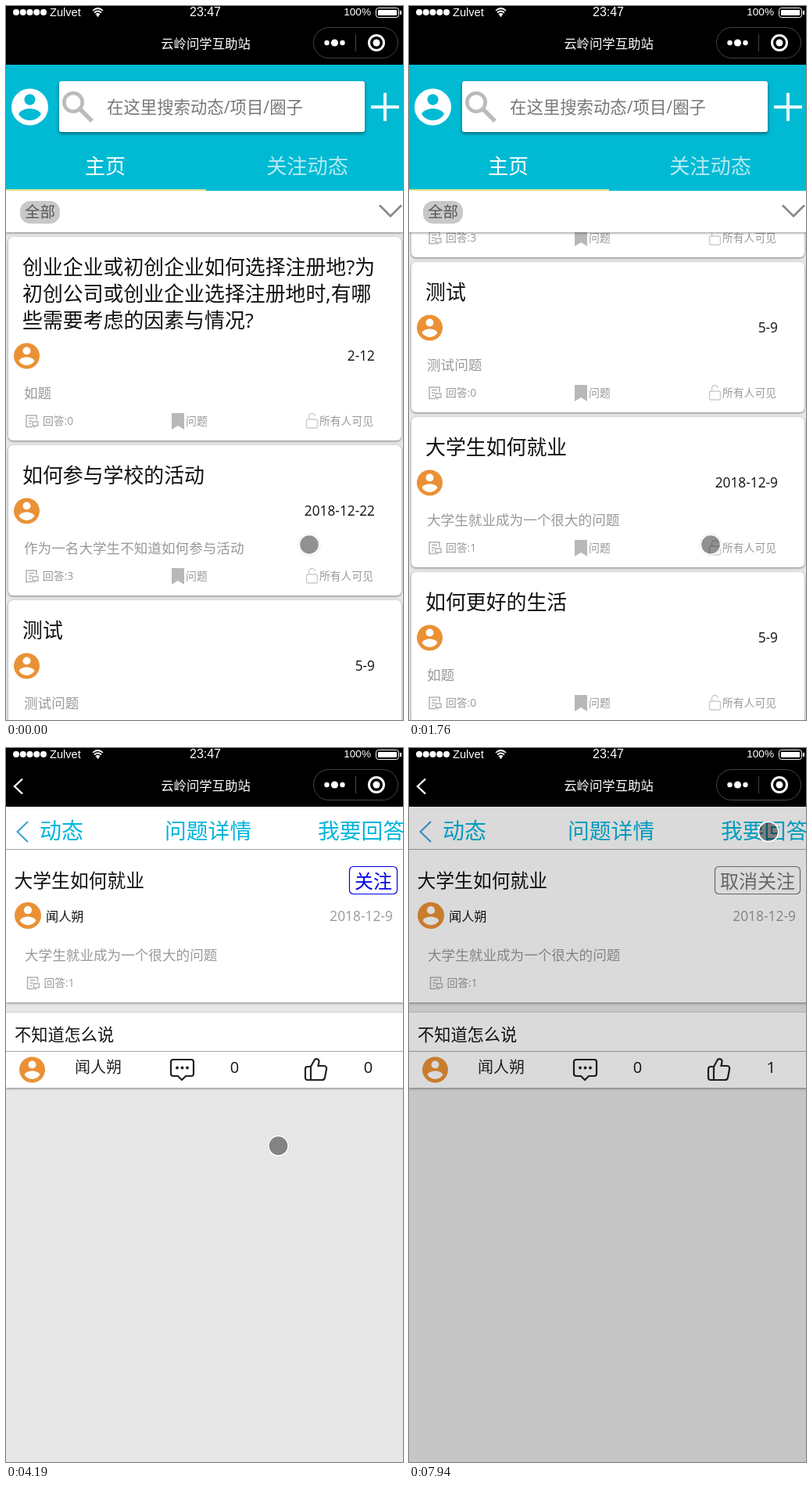
An HTML page with a canvas for the animation above (7.99 s loop, 508 px wide and 912 px high).

```html
<!DOCTYPE html>
<html lang="zh-CN">
<head>
<meta charset="utf-8">
<style>
html, body { margin: 0; width: 100%; height: 100%; overflow: hidden; background: #000; }
canvas { display: block; }
</style>
</head>
<body>
<canvas id="stage" width="508" height="912"></canvas>
<script>
const LOOP = 7990, W = 508, H = 912;
const CJK = '"Open Sans", "Noto Sans CJK SC", "Noto Sans CJK", sans-serif';
const ARIAL = '"Liberation Sans", sans-serif';
const CYAN = '#00bad4', ORANGE = '#ea9135', PAGE = '#e7e7e7';
const USER = '闻人朔';
const c = document.getElementById('stage').getContext('2d');

// [time, value...] keys, linear in between
const SCROLL = [[545, 0], [1380, 252], [1700, 420], [1760, 432]];
const POINTER = [
  [590, 388, 688], [640, 386, 688], [2220, 386, 688], [2960, 322, 586],
  [3740, 322, 586], [3850, 319, 578], [4190, 348, 509], [4450, 479, 290],
  [4570, 462, 233], [4930, 460, 166], [5260, 460, 166], [5720, 436, 391],
  [5900, 440, 405], [6350, 440, 405], [6800, 492, 240], [7070, 482, 167],
  [7300, 460, 107]
];

const CARDS = [
  { title: ['创业企业或初创企业如何选择注册地?为', '初创公司或创业企业选择注册地时,有哪', '些需要考虑的因素与情况?']
      .map(s => s.replace('?', '?').replace(',', ',')), date: '2-12', body: '如题', n: 0 },
  { title: ['如何参与学校的活动'], date: '2018-12-22', body: '作为一名大学生不知道如何参与活动', n: 3 },
  { title: ['测试'], date: '5-9', body: '测试问题', n: 0 },
  { title: ['大学生如何就业'], date: '2018-12-9', body: '大学生就业成为一个很大的问题', n: 1 },
  { title: ['如何更好的生活'], date: '5-9', body: '如题', n: 0 }
];

function sample(keys, t) {
  const i = keys.findIndex(k => k[0] > t);
  if (i === 0) return keys[0].slice(1);
  if (i < 0) return keys[keys.length - 1].slice(1);
  const a = keys[i - 1], b = keys[i], p = (t - a[0]) / (b[0] - a[0]);
  return a.slice(1).map((v, j) => v + (b[j + 1] - v) * p);
}

// y is the visual middle of the line
function text(s, x, y, size, color, align = 'left', font = CJK) {
  c.font = size + 'px ' + font;
  c.fillStyle = color;
  c.textAlign = align;
  c.fillText(s, x, y + size * 0.37);
}

function rect(x, y, w, h, color) {
  c.fillStyle = color;
  c.fillRect(x, y, w, h);
}

function round(x, y, w, h, r, fill, stroke, lw = 1) {
  c.beginPath();
  c.roundRect(x, y, w, h, r);
  if (fill) { c.fillStyle = fill; c.fill(); }
  if (stroke) { c.strokeStyle = stroke; c.lineWidth = lw; c.stroke(); }
}

function disc(x, y, r, color) {
  c.beginPath();
  c.arc(x, y, r, 0, 7);
  c.fillStyle = color;
  c.fill();
}

function ring(x, y, r, color, lw) {
  c.beginPath();
  c.arc(x, y, r, 0, 7);
  c.strokeStyle = color;
  c.lineWidth = lw;
  c.stroke();
}

function line(d, color, lw, x = 0, y = 0) {
  c.save();
  c.translate(x, y);
  c.strokeStyle = color;
  c.lineWidth = lw;
  c.stroke(new Path2D(d));
  c.restore();
}

function shadowed(draw, blur = 3, dy = 1) {
  c.save();
  c.shadowColor = 'rgba(0,0,0,.45)';
  c.shadowBlur = blur;
  c.shadowOffsetY = dy;
  draw();
  c.restore();
}

function avatar(x, y, r, color, inner) {
  disc(x, y, r, color);
  c.save();
  c.translate(x, y);
  c.scale(r / 10, r / 10);
  disc(0, -4, 3, inner);
  c.fill(new Path2D('M-6 4C-6 2-2 .9 0 .9S6 2 6 4C4.7 6 2.5 7.2 0 7.2S-4.7 6-6 4Z'));
  c.restore();
}

function answers(x, y, n) {
  line('M9 7.5H1V-7H14V-1M4-3.5H11M4 0H8M4 3.5H7', '#b0b0b0', 1.5, x, y);
  line('M9 1H16V6H13L11 8V6H9Z', '#b0b0b0', 1.3, x, y);
  text('回答:' + n, x + 22, y, 13.8, '#999');
}

function card(d, y) {
  const extra = (d.title.length - 1) * 34;
  shadowed(() => round(3, y, 503, 192 + extra, 6, '#fff'));
  d.title.forEach((s, i) => text(s, 21, y + 38 + i * 34, 25.9, '#111'));
  y += extra;
  avatar(26.5, y + 84, 16.5, ORANGE, '#fff');
  text(d.date, 472, y + 84, 17.3, '#111', 'right');
  text(d.body, 23, y + 131, 17.6, '#999');
  const m = y + 167;
  answers(25, m, d.n);
  c.fillStyle = '#b8b8b8';
  c.fill(new Path2D(`M212 ${m - 10}h16v21l-8-5-8 5z`));
  text('问题', 230, m, 13.9, '#999');
  round(384.5, m - 2, 14, 11, 2, null, '#ccc', 1.4);
  line('M3-2V-5A4 4 0 0 1 11-6', '#ccc', 1.4, 384.5, m);
  text('所有人可见', 401, m, 13.8, '#999');
}

function home(t) {
  rect(0, 75, W, H, PAGE);
  let y = 295 - sample(SCROLL, t)[0];
  for (const d of CARDS) {
    card(d, y);
    y += 198 + (d.title.length - 1) * 34;
  }
  shadowed(() => rect(0, 236, W, 53, '#fff'));
  rect(0, 75, W, 161, CYAN);
  rect(0, 234, 256, 2, '#dfe48a');

  avatar(30.5, 129, 23.5, '#fff', CYAN);
  shadowed(() => round(68, 96, 391, 65, 3, '#fff'), 4, 2);
  ring(86, 123, 11.7, '#bbb', 4.6);
  line('M94 131L110 147', '#bbb', 5.5);
  text('在这里搜索动态/项目/圈子', 129, 129, 21.4, '#777');
  line('M467 129H503M485 111V147', '#e8fafc', 4);
  text('主页', 127, 204, 26, '#fff', 'center');
  text('关注动态', 385.5, 204, 26.2, 'rgba(255,255,255,.7)', 'center');

  round(18, 249, 51, 29, 13, '#c8c8c8');
  text('全部', 24, 263, 19.4, '#555');
  line('M478 254.5L492 268.5L506 254.5', '#888', 2.6);
}

function detail(x, followed, likes) {
  c.save();
  c.translate(x, 0);
  const left = x > 0 ? -3 : 0;
  rect(left, 75, W + 3, H, PAGE);
  shadowed(() => rect(left, 130, W + 3, 195, '#fff'));
  shadowed(() => rect(left, 338, W + 3, 96, '#fff'));
  rect(left, 75, W + 3, 54, '#fff');
  rect(left, 129, W + 3, 1, '#a5a5a5');
  rect(left, 387, W + 3, 1, '#a5a5a5');

  line('M28 94L14.5 107L28 120', '#3a9fd6', 2);
  text('动态', 43, 106, 28, '#00b5dc');
  text('问题详情', 203, 106, 27.8, '#00b5dc');
  text('我要回答', 399, 106, 27.8, '#00b5dc');

  text('大学生如何就业', 10.5, 169, 23.8, '#111');
  const tone = followed ? '#777' : '#0000e8', w = followed ? 109 : 61;
  round(500.5 - w, 151.5, w, 35, 5, null, tone, 1.2);
  text(followed ? '取消关注' : '关注', 494, 170, 24, tone, 'right');
  avatar(28, 214, 17, ORANGE, '#fff');
  text(USER, 51, 215, 16.2, '#111');
  text('2018-12-9', 495, 215, 17.4, '#999', 'right');
  text('大学生就业成为一个很大的问题', 24, 264, 17.6, '#999');
  answers(26.5, 300, 1);

  text('不知道怎么说', 11, 366, 21.2, '#111');
  avatar(33.5, 411, 16.5, ORANGE, '#fff');
  text(USER, 88, 408, 20, '#222');
  line('M214 398H237Q240 398 240 401V416Q240 419 237 419H230L225 424L220 419H214Q211 419 211 416V401Q211 398 214 398Z', '#222', 2.2);
  for (const dx of [-6.5, 0, 6.5]) disc(225.5 + dx, 408.5, 1.9, '#222');
  text('0', 292.5, 408, 20, '#111', 'center');
  line('M390 424V407L395 398C398 396 401 398 400.5 401L399.5 406H406Q411 406 410 410.5L408 421Q407.5 424 404 424H386Q383 424 383 421V410Q383 407 386 407H390', '#222', 2.2);
  text(likes, 463.5, 408, 20, '#111', 'center');
  c.restore();
}

function statusBar(back) {
  rect(0, 0, W, 75, '#000');
  for (let i = 0; i < 5; i++) disc(13 + i * 8.75, 8, 4, '#fff');
  text('Zulvet', 56, 7.3, 14.6, '#fff', 'left', ARIAL);
  line('M111 6Q117.500 0 124 6M113 8.500Q117.500 4.500 122 8.500M115 11Q117.500 9 120 11', '#fff', 1.7);
  disc(117.5, 12.3, 1.4, '#fff');
  text('23:47', 255, 7.3, 16, '#fff', 'center', ARIAL);
  text('100%', 467, 7.3, 13.6, '#fff', 'right', ARIAL);
  round(473.5, 2.5, 29, 12, 3, null, '#fff', 1);
  round(476, 5, 24, 7, 1, '#fff');
  rect(504, 6, 2, 5, '#fff');

  text('云岭问学互助站', 255.5, 48, 16.4, '#fff', 'center');
  round(393.5, 27.5, 108, 39, 19.5, null, '#444');
  disc(410.5, 47, 3.2, '#fff');
  disc(420.5, 47, 4.6, '#fff');
  disc(430.5, 47, 3.2, '#fff');
  rect(447, 36, 1, 22, '#444');
  ring(474, 47, 9.5, '#fff', 3);
  disc(474, 47, 4.5, '#fff');
  if (back) line('M21 39.500L11 49L21 58.500', '#fff', 2.4);
}

function pointer(t) {
  const [x, y] = sample(POINTER, t);
  ring(x, y, 14, 'rgba(120,120,120,.25)', 1);
  ring(x, y, 12.8, '#fff', 2);
  disc(x, y, 11.8, 'rgba(0,0,0,.43)');
}

// the incoming page advances every 40 ms
function slide(t) {
  const step = 3150 + Math.floor((t - 3150) / 40) * 40;
  const p = Math.min(1, (step - 3115) / 195);
  return 512 * Math.pow(1 - p, 1.56);
}

function draw(t) {
  if (t < 3310) home(t);
  if (t >= 3150) detail(slide(t), t >= 5200, t >= 6280 ? 1 : 0);
  if (t >= 5200 && t < 6700) {
    round(198, 430, 116, 51, 5, 'rgba(56,56,56,.88)');
    text('关注成功', 255.5, 456, 16.2, '#fff', 'center');
  }
  if (t >= 7860) {
    const n = 1 + Math.floor((t - 7860) / 40);
    rect(0, 75, W, H, `rgba(0,0,0,${Math.min(n, 3) * 0.048})`);
  }
  statusBar(t >= 2900);
  pointer(t);
}

const start = performance.now();
function tick() {
  draw((performance.now() - start) % LOOP);
  requestAnimationFrame(tick);
}
tick();
</script>
</body>
</html>
```
